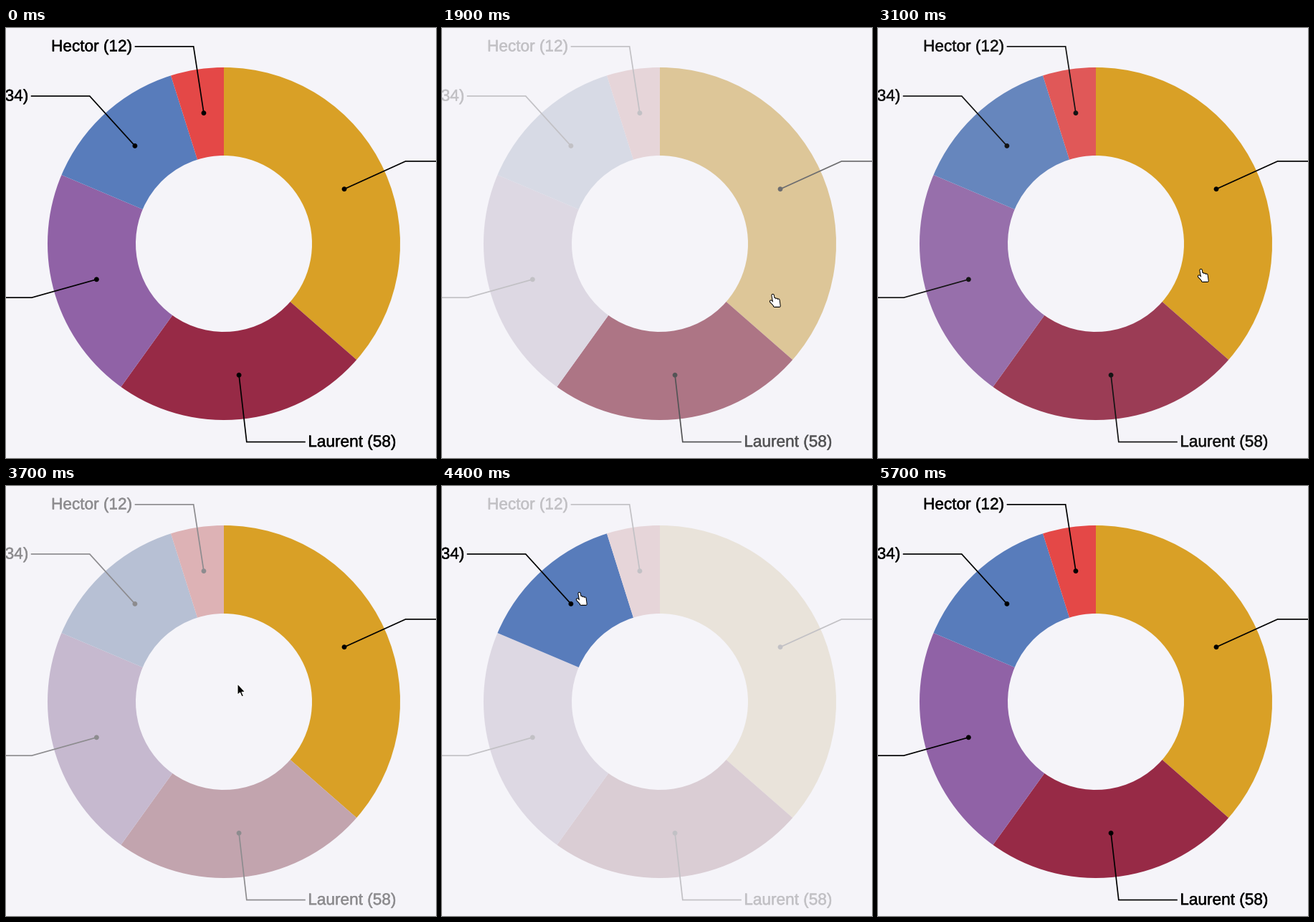
Recreate the animation shown at these times as a matplotlib script. Size 600x600 px, loop 5.8 s.

```python
import numpy as np
import matplotlib.pyplot as plt
from matplotlib.animation import FuncAnimation
from matplotlib.colors import to_rgb
from matplotlib.patches import Circle, Polygon, Wedge
from matplotlib.patheffects import withStroke

SIZE, DPI = 600, 100
FRAMES, INTERVAL = 58, 100
PX = 72 / DPI
CENTER = np.array([304, 301])
OUTER, INNER, ELBOW = 246, 123, 278.4
LEADER, LABEL_GAP = 82, 3.5
DIM, FADE, GRAYING = 0.21, 350, 0.5
BACKGROUND = np.array(to_rgb("#f5f4f9"))

plt.rcParams["font.family"] = "Liberation Sans"

# value, color, label (empty where it lies off the stage)
SLICES = [
    (90, "#d9a026", ""),
    (58, "#972a46", "Laurent (58)"),
    (53, "#9062a6", ""),
    (34, "#587cbb", "(34)"),
    (12, "#e44847", "Hector (12)"),
]
BOUNDS = np.cumsum([0] + [s[0] for s in SLICES])
BOUNDS = 360 * BOUNDS / BOUNDS[-1]

# cursor stops: arrival ms, departure ms, x, y
STOPS = [
    (430, 430, 415, 495), (700, 1500, 384, 461), (1900, 2100, 461, 372),
    (2800, 2800, 350, 300), (3100, 3550, 450, 337), (3700, 3700, 323, 276),
    (4200, 4700, 191, 149), (5100, 5100, -10, 60),
]
TIMES, XS, YS = zip(*((t, x, y) for a, b, x, y in STOPS for t in (a, b)))

fig = plt.figure(figsize=(SIZE / DPI, SIZE / DPI), dpi=DPI, facecolor=BACKGROUND)
ax = fig.add_axes([0, 0, 1, 1])
ax.set(xlim=(0, SIZE), ylim=(SIZE, 0))
ax.axis("off")


def polar(radius, degrees):
    """Point around the center, clockwise from the top."""
    a = np.radians(degrees)
    return CENTER + radius * np.array([np.sin(a), -np.cos(a)])


def cursor_at(t):
    if not TIMES[0] <= t < TIMES[-1]:
        return None
    return np.array([np.interp(t, TIMES, XS), np.interp(t, TIMES, YS)])


def slice_at(spot):
    if spot is None:
        return None
    dx, dy = spot - CENTER
    if not INNER < np.hypot(dx, dy) < OUTER:
        return None
    angle = np.degrees(np.arctan2(dx, -dy)) % 360
    return int(np.searchsorted(BOUNDS, angle)) - 1


def hover_changes():
    changes, current = [], None
    for t in range(0, FRAMES * INTERVAL, 10):
        hovered = slice_at(cursor_at(t))
        if hovered != current:
            changes.append((t, hovered))
            current = hovered
    return changes


HOVERS = hover_changes()


def opacity(index, t):
    value = 1.0
    for start, active in HOVERS:
        goal = 1.0 if active in (None, index) else DIM
        u = np.clip((t - start) / FADE, 0, 1)
        value += (goal - value) * u * u * (3 - 2 * u)
    return value


def faded(color, alpha):
    """Blend into the background, losing saturation on the way."""
    rgb = np.array(to_rgb(color))
    gray = rgb @ [0.299, 0.587, 0.114]
    rgb = rgb + (gray - rgb) * GRAYING * (1 - alpha) / (1 - DIM)
    return BACKGROUND + (rgb - BACKGROUND) * alpha


class Slice:
    def __init__(self, start, end, color, label):
        self.color = color
        middle = (start + end) / 2
        point, elbow = polar((INNER + OUTER) / 2, middle), polar(ELBOW, middle)
        side = 1 if middle < 180 else -1
        tip = elbow + [side * LEADER, 0]
        self.wedge = ax.add_patch(Wedge(CENTER, OUTER, start - 90, end - 90,
                                        width=OUTER - INNER, lw=0))
        self.dot = ax.add_patch(Circle(point, 3.4, lw=0, zorder=3))
        self.line, = ax.plot(*zip(point, elbow, tip), lw=1.7 * PX, zorder=3,
                             solid_capstyle="butt", solid_joinstyle="miter")
        self.text = ax.text(tip[0] + side * LABEL_GAP, tip[1] + 6.6, label,
                            ha="left" if side > 0 else "right",
                            va="baseline", size=22.6 * PX, zorder=3)

    def fade(self, alpha):
        ink = faded("black", alpha)
        self.wedge.set_facecolor(faded(self.color, alpha))
        self.dot.set_facecolor(ink)
        self.line.set_color(ink)
        self.text.set_color(ink)
        self.text.set_path_effects([withStroke(linewidth=0.4 * PX, foreground=ink)])


def hand_strokes():
    """Four fingers and a thumb as round strokes, hot spot at the origin."""
    strokes = []
    for k in range(4):
        top = 1 if k == 0 else 5.2 + 0.8 * k
        strokes += [(0.6 + 2.6 * k, top), (3.2 + 2.1 * k, 15.8), (np.nan, np.nan)]
    return np.array(strokes + [(-2, 9.5), (3.4, 15)])


HAND = hand_strokes()
ARROW = np.array([(0, 0), (0, 15.5), (3.5, 12.3), (6, 18), (8.5, 17),
                  (6, 11.5), (10.8, 11.5)])

slices = [Slice(a, b, color, label)
          for a, b, (_, color, label) in zip(BOUNDS, BOUNDS[1:], SLICES)]
hand = [ax.plot([], [], color=color, lw=width * PX, solid_capstyle="round", zorder=z)[0]
        for color, width, z in (("black", 4.4, 5), ("white", 2.4, 6))]
arrow = ax.add_patch(Polygon(ARROW, fc="black", ec="white", lw=1.1 * PX, zorder=5))


def place_cursor(t):
    spot = cursor_at(t)
    pointing = slice_at(spot) is not None
    arrow.set_visible(spot is not None and not pointing)
    for line in hand:
        line.set_visible(pointing)
    if spot is not None:
        arrow.set_xy(ARROW + spot)
        for line in hand:
            line.set_data(*(HAND + spot).T)


def update(frame):
    t = frame * INTERVAL
    for index, part in enumerate(slices):
        part.fade(opacity(index, t))
    place_cursor(t)
    return []


anim = FuncAnimation(fig, update, frames=FRAMES, interval=INTERVAL,
                     repeat=True, repeat_delay=0, blit=False)
plt.show()
```
